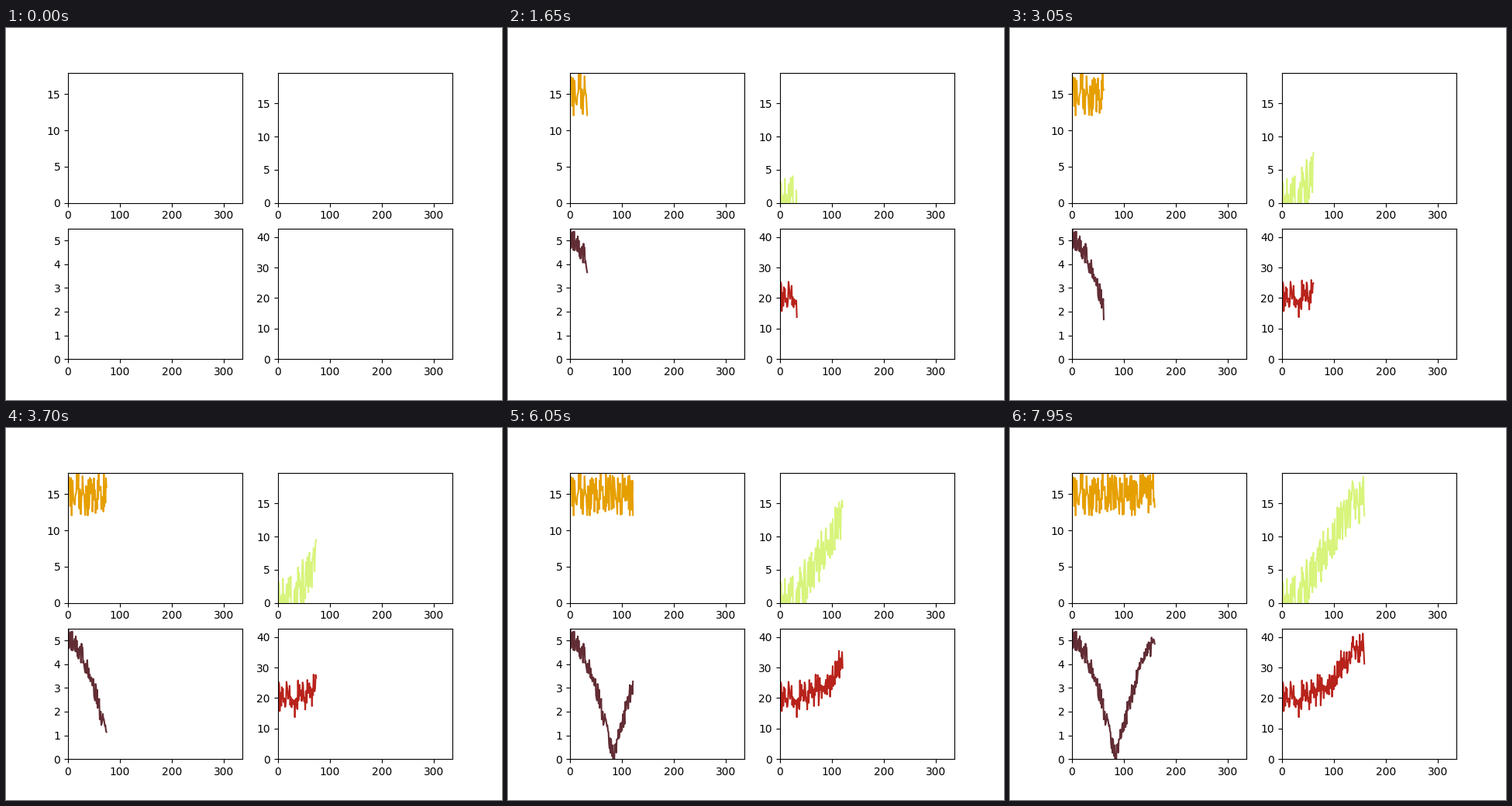
Write a matplotlib script that moves like this. It is 640 by 480 pixels and loops after 8 s.

```python
import numpy as np
import matplotlib.pyplot as plt
from matplotlib.animation import FuncAnimation

PERIOD = 336
FRAMES = 160

rng = np.random.default_rng(7)
x = np.arange(1, FRAMES + 1)
wave = np.cos(2 * np.pi * x / PERIOD)


def noisy(base, spread):
    """Add even noise of the given half-width to a smooth curve."""
    return base + rng.uniform(-spread, spread, FRAMES)


steady = noisy(15, 2.97)
rising = noisy(8 - 8 * wave, 3.8)
dipping = noisy(5 * np.abs(wave), 0.45)
total = steady + rising + dipping

# values, top of the y axis, colour
panels = [
    (steady, 17.97, "#e69f00"),
    (rising, 19.64, "#d8f47c"),
    (dipping, 5.49, "#622d35"),
    (total, 42.65, "#b8231b"),
]

fig, axes = plt.subplots(2, 2, figsize=(6.4, 4.8), dpi=100)
lines = []
for ax, (_, top, color) in zip(axes.flat, panels):
    ax.set_xlim(0, PERIOD)
    ax.set_ylim(0, top)
    lines += ax.plot([], [], color=color, lw=1.5)


def update(n):
    """Show the first n samples of every series."""
    for line, (values, _, _) in zip(lines, panels):
        line.set_data(x[:n], values[:n])
    return lines


anim = FuncAnimation(fig, update, frames=FRAMES, interval=50,
                     init_func=lambda: update(0), repeat=True,
                     repeat_delay=0, blit=False)
plt.show()
```
